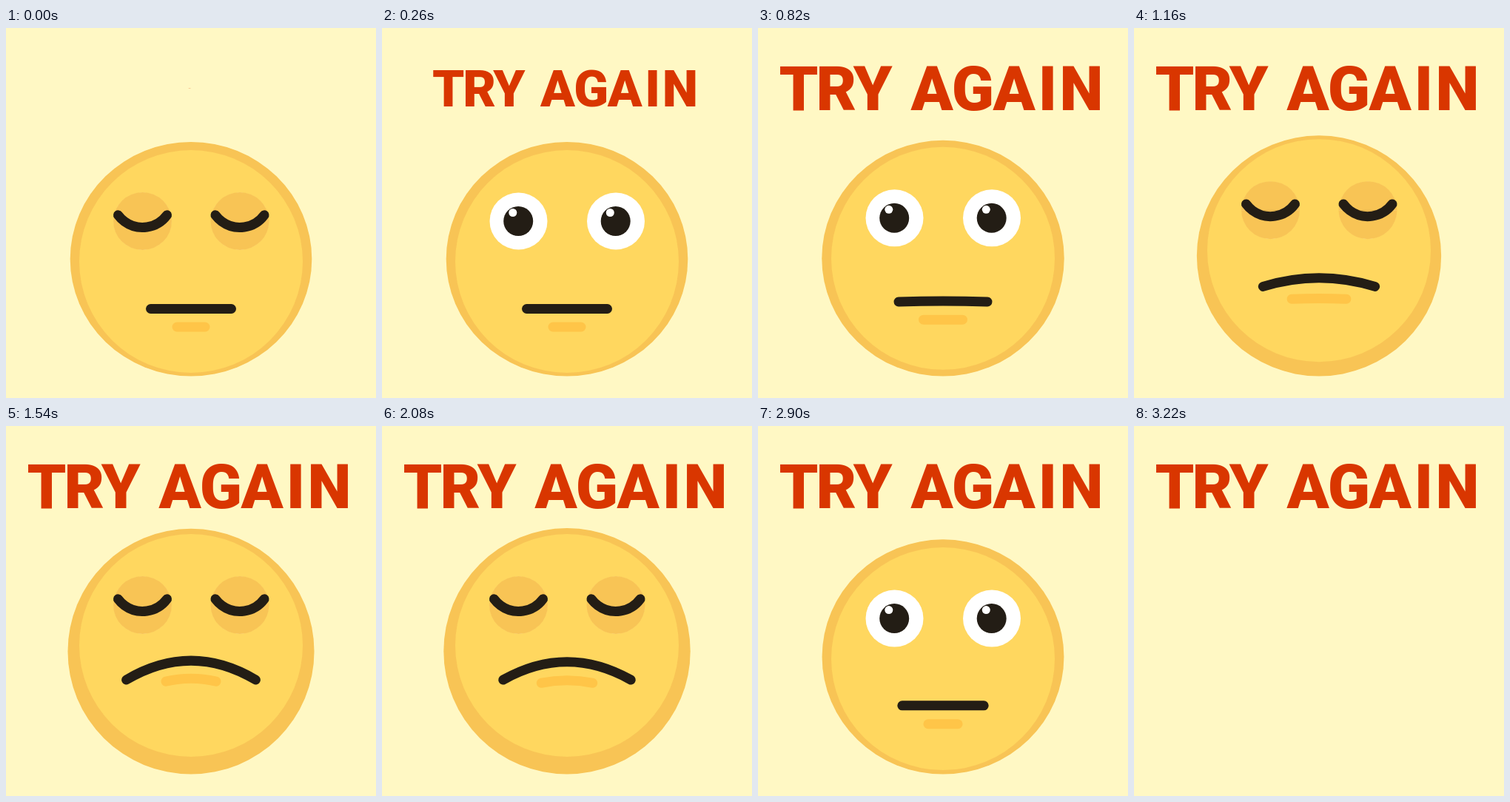
Write an HTML page with a canvas that moves like this. It is 500 px wide and 500 px high and loops after 3.24 s.

```html
<!DOCTYPE html>
<html lang="en">
<head>
<meta charset="utf-8">
<title>Try again</title>
<style>
  html, body { margin: 0; width: 100%; height: 100%; overflow: hidden; background: #fff8c4; }
  canvas { display: block; }
</style>
</head>
<body>
<canvas id="stage" width="500" height="500"></canvas>
<script>
const LOOP = 3240, FACE_END = 3220;
const INK = '#231d15', RIM = '#f8c455', SKIN = '#ffd75f', CHIN = '#ffc548', RED = '#d93600';
const LETTERS = [['T', 55], ['R', 106], ['Y', 155], ['A', 235], ['G', 290.5], ['A', 346], ['I', 391.5], ['N', 437]];
const ctx = document.getElementById('stage').getContext('2d');

const ease = (t, from, to) => {
  const k = Math.min(1, Math.max(0, (t - from) / (to - from)));
  return k * k * (3 - 2 * k);
};
const riseFall = (t, a, b, c, d) => ease(t, a, b) - ease(t, c, d);

function ellipse(x, y, rx, ry, color) {
  ctx.beginPath();
  ctx.ellipse(x, y, rx, ry, 0, 0, 2 * Math.PI);
  ctx.fillStyle = color;
  ctx.fill();
}

function stroke(color) {
  ctx.strokeStyle = color;
  ctx.lineWidth = 13;
  ctx.lineCap = 'round';
  ctx.stroke();
}

// Symmetric stroke around x = 250, bulging upwards by `sag`.
function bow(half, y, sag, color) {
  ctx.beginPath();
  ctx.moveTo(250 - half, y);
  ctx.quadraticCurveTo(250, y - 2 * sag, 250 + half, y);
  stroke(color);
}

function eye(x, y, closed) {
  ctx.save();
  ctx.translate(x, y);
  ellipse(0, 0, 39, 38.5, '#fff');
  ellipse(-0.3, 0, 20, 20, INK);
  ellipse(-7.7, -11.5, 5.5, 5.5, '#fff');
  ctx.save();
  ctx.beginPath();
  ctx.ellipse(0, 0, 39.5, 39, 0, 0, 2 * Math.PI);
  ctx.clip();
  ctx.fillStyle = RIM;
  ctx.fillRect(-40, -40, 80, 40 * closed);
  ctx.fillRect(-40, 40 - 40 * closed, 80, 40 * closed);
  ctx.restore();
  ctx.globalAlpha = Math.max(0, closed * 4 - 3);
  ctx.beginPath();
  ctx.arc(0, -32.5, 41, Math.PI / 2 - 0.935, Math.PI / 2 + 0.935);
  stroke(INK);
  ctx.restore();
}

function face(t) {
  const head = riseFall(t, 560, 1700, 2190, 2997);
  const lift = 19 * riseFall(t, 560, 1420, 2195, 3010);
  const sad = riseFall(t, 560, 1570, 1960, 2990);
  const closed = 1 - ease(t, 30, 240) + riseFall(t, 860, 1060, 2180, 2390) + ease(t, 3010, 3200);

  const top = 154 - 16 * head;
  ellipse(250, (top + 470.5) / 2, 163.3 + 3.4 * head, (470.5 - top) / 2, RIM);
  ellipse(250, 315.5 - lift, 151, 150.5, SKIN);
  eye(184.5, 261 - lift, closed);
  eye(316, 261 - lift, closed);

  bow(19 + 15 * sad + 36 * sad * (1 - sad), 404 - 59 * sad, 4 * sad ** 4, CHIN);
  bow(54.5 + 33 * sad, 379.5 - lift - 17.5 * (1 - (1 - sad) ** 2), 26 * sad ** 1.8, INK);
}

function caption(t) {
  const scale = 1 - Math.max(0, 1 - t / 900) ** 5;
  if (!scale) return;
  ctx.save();
  ctx.translate(248, 82);
  ctx.scale(scale, scale);
  ctx.font = '900 84px Roboto, sans-serif';
  ctx.textAlign = 'center';
  ctx.fillStyle = RED;
  for (const [letter, x] of LETTERS) ctx.fillText(letter, x - 248, 29);
  ctx.restore();
}

function draw() {
  const t = performance.now() % LOOP;
  ctx.fillStyle = '#fff8c4';
  ctx.fillRect(0, 0, 500, 500);
  if (t < FACE_END) face(t);
  caption(t);
  requestAnimationFrame(draw);
}
draw();
</script>
</body>
</html>
```
